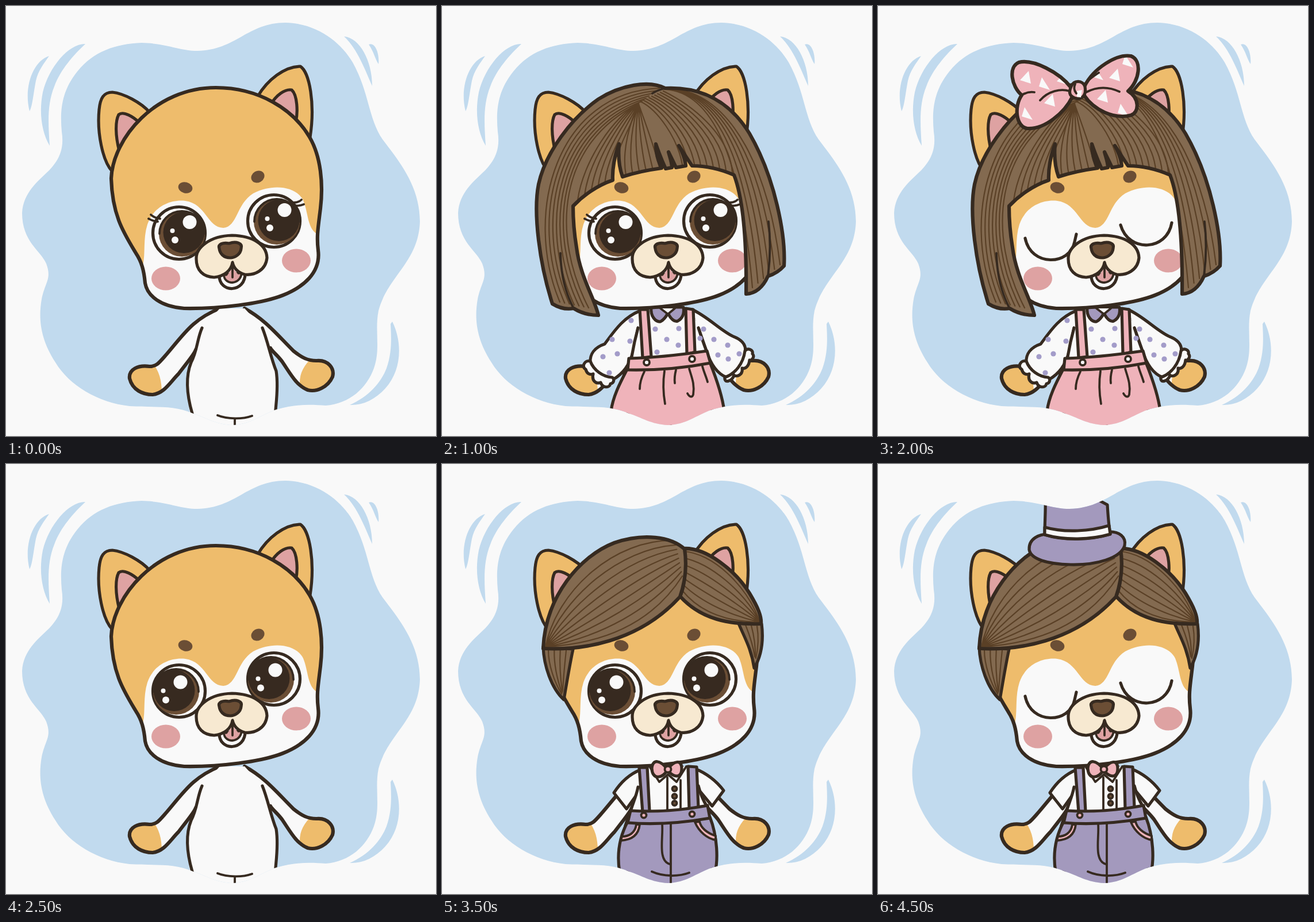
An HTML page that plays this animation: 748 px wide and 748 px high, repeating every 5000 ms.

```html
<!DOCTYPE html>
<html lang="en">
<head>
<meta charset="utf-8">
<title>Dress-up pup</title>
<style>
html, body { margin: 0; width: 100%; height: 100%; overflow: hidden; background: #f9f9f9; }
svg { display: block; width: 100%; height: 100%; }
path, circle, ellipse { fill: none; stroke-linecap: round; stroke-linejoin: round; }
.ink { stroke: #362a20; stroke-width: 5.2; }
.bold { stroke-width: 6.2; }
.thin { stroke-width: 3.8; }
.white { fill: #f9f9f9; }
.sky { fill: #c1daee; }
.tan { fill: #eebc6c; }
.rose { fill: #dea2a2; }
.cream { fill: #f7e9d1; }
.brown { fill: #6b4e35; }
.dark { fill: #372a20; }
.hair { fill: #836a50; }
.pink { fill: #efb3ba; }
.lilac { fill: #a399bd; }
.dot { fill: #a39cc9; }
.strand { stroke: #5a4026; stroke-width: 2.2; }
</style>
</head>
<body>
<svg id="stage" viewBox="0 0 748 748"></svg>
<script>
const shapes = {
  blob: 'M97 219C94 185 95 150 124 114C152 79 190 66 236 64C280 65 302 78 333 78C400 77 420 29 486 29C540 30 582 62 603 98C632 150 630 195 655 232C682 268 720 312 720 375C718 445 664 470 648 530C641 565 652 596 640 630C628 664 598 692 556 695C530 693 505 692 470 702C440 713 425 728 393 729C365 728 345 715 326 709C290 693 260 699 215 696C160 690 110 660 86 620C60 580 56 545 62 510C68 480 80 475 70 448C60 425 28 410 28 360C30 325 55 305 75 286C95 265 101 245 97 219Z',
  head: 'M365 142C440 142 500 180 528 228C548 262 552 310 547 352C543 385 540 400 543 425C548 464 517 489 482 503C445 518 370 527 310 526C270 523 246 505 242 482C240 460 236 445 226 430C205 395 185 365 183 300C186 230 260 142 365 142Z',
  arms: 'M372 526C325 545 310 570 280 605C265 622 262 627 250 627C230 624 213 632 215 648C220 668 238 676 255 676C275 674 285 655 300 640C315 620 328 605 330 598M415 526C450 545 470 570 500 600C515 612 525 617 540 617C560 615 572 630 568 645C560 663 540 672 525 668C505 660 495 640 480 618C470 605 462 600 460 595',
  bob: 'M388 143C360 128 310 138 272 162C225 195 180 255 168 310C158 360 170 450 192 518C205 526 218 528 229 526C242 534 258 538 272 538C266 510 240 470 234 420C229 390 228 370 228 348C245 330 270 312 297 303C296 285 300 260 308 240C306 262 308 280 314 297C338 289 360 285 382 282C376 270 372 258 372 240C378 258 384 272 389 283L400 281C400 272 396 262 394 254C399 264 404 274 407 281L424 278C423 266 417 252 412 243C420 255 428 268 435 278C460 278 485 284 508 294C522 330 530 400 529 501C545 500 558 490 567 470C580 466 588 460 595 452C598 400 580 300 535 222C500 165 450 140 388 143Z',
  sweepL: 'M422 148C398 126 350 120 300 137C240 160 180 230 176 321C240 324 340 312 414 231C423 205 426 175 422 148Z',
  sweepR: 'M420 147C460 145 510 185 535 225C550 250 556 265 555 278C500 280 450 270 414 230C425 205 424 170 420 147Z',
  bow: 'M336 142C315 115 270 92 245 98C226 106 232 140 250 155C236 175 240 211 260 213C290 215 325 185 338 158ZM359 140C375 108 415 83 440 87C460 95 455 130 435 148C455 160 455 185 440 190C410 198 375 180 359 156Z'
};

const path = (cls, d) => `<path class="${cls}" d="${d}"/>`;
const circle = (cls, x, y, r) => `<circle class="${cls}" cx="${x}" cy="${y}" r="${r}"/>`;
const oval = (cls, x, y, rx, ry, turn = 0) =>
  `<ellipse class="${cls}" cx="${x}" cy="${y}" rx="${rx}" ry="${ry}" transform="rotate(${turn} ${x} ${y})"/>`;
const layer = (id, body) => `<g id="${id}">${body}</g>`;
const clipped = (name, body) => `<g clip-path="url(#clip-${name})">${body}</g>`;

// Strands blended between two cubic curves
function fan(count, first, last) {
  let d = '';
  for (let i = 0; i < count; i++) {
    const k = i / (count - 1);
    const c = first.map((v, j) => (v + (last[j] - v) * k).toFixed(1));
    d += `M${c[0]} ${c[1]}C${c.slice(2).join(' ')}`;
  }
  return path('strand', d);
}

const lock = (name, strands) =>
  path('hair', shapes[name]) + clipped(name, strands) + path('ink bold', shapes[name]);

function eye(x, y, side) {
  const gx = side > 0 ? 0 : -16, gy = side > 0 ? 0 : 3.5;
  return circle('white ink', x, y, 45.5) +
    circle('brown', x + 5 * side, y + 1, 40) +
    circle('dark', x + 8.5 * side, y - 1, 36) +
    path('ink thin', `M${x + side * 5 - 39} ${y + 1}a39 39 0 0 1 78 0`) +
    circle('white', x + 18.5 + gx, y - 19 + gy, 12) +
    circle('white', x - 11.5 + gx, y - 4 + gy, 4) +
    circle('white', x - 7 + gx, y + 12 + gy, 6);
}
const eyes = side => eye(301, 395, side) + eye(466, 374, side);

const scenery = path('sky', shapes.blob) + path('sky',
  'M75 87C48 95 30 140 41 183C46 175 48 150 52 130C56 112 66 100 75 87Z' +
  'M138 66C110 65 75 105 64 150C57 185 62 220 76 243C73 200 72 170 84 140C95 110 118 85 138 66Z' +
  'M588 53C615 55 637 95 637 139C626 115 612 75 588 53Z' +
  'M631 67C643 62 650 85 648 101C642 92 640 80 631 67Z' +
  'M672 549C691 588 687 635 660 665C642 685 620 695 598 694C630 680 652 656 662 630C672 602 670 575 669 553Z');

const body =
  path('white', shapes.arms) +
  clipped('arms', path('tan', 'M254 620C268 636 272 655 271 685H200V620ZM534 610C518 625 511 638 511 656L515 685H590V610Z')) +
  path('ink bold', shapes.arms) +
  path('white', 'M372 526H415L446 560C456 585 460 610 470 635C474 660 470 690 469 740H324C317 685 310 650 322 620C333 600 332 580 341 560Z') +
  path('ink', 'M341 560C332 580 333 600 322 620C310 650 317 685 324 709M446 560C456 585 460 610 470 635C474 660 470 690 469 702') +
  path('ink thin', 'M368 712C385 719 412 719 428 713M398 718V728');

const dotSpots = [[329,547],[296,580],[327,583],[280,610],[305,605],[291,638],[371,562],[412,561],
  [391,580],[374,602],[411,590],[455,562],[473,580],[449,578],[497,590],[480,607],[498,614],[517,605]];

const dress =
  path('white ink', 'M345 530C315 542 300 565 283 588C265 594 257 606 258 620C262 635 280 650 297 650C315 640 326 625 333 600L341 560') +
  path('white ink', 'M435 528C462 540 485 565 507 575C525 582 530 592 527 605C524 625 510 640 495 646C480 640 468 625 460 600L446 560') +
  path('white', 'M345 528H435L446 560L460 602L330 614L341 560Z') +
  path('ink', 'M341 560C336 578 333 592 330 610M446 560C452 578 456 590 460 600') +
  dotSpots.map(([x, y]) => circle('dot', x, y, 4.6)).join('') +
  path('white ink', 'M258 618C248 615 242 628 250 632C252 640 258 642 263 640C260 652 268 658 276 655C280 666 292 664 293 657C300 656 300 648 296 646C280 645 264 634 258 618ZM527 600C532 594 542 598 540 605C545 610 538 618 535 616C534 626 528 632 522 630C524 642 512 646 508 642C506 652 490 658 492 646C510 640 524 622 527 600Z') +
  path('lilac ink', 'M364 524C362 540 372 550 380 549C386 546 390 540 393 534C398 545 405 550 410 548C418 544 422 535 420 524Z') +
  path('white ink thin', 'M380 526L393 536L405 526') +
  path('pink ink', 'M344 528H358L364 610L349 612ZM424 526L437 528L440 602L426 606Z') +
  path('pink ink', 'M322 632C310 655 297 680 294 705V745H491V705C488 680 478 650 466 620Z') +
  path('pink ink', 'M325 613C370 612 420 606 461 600L467 621C420 630 370 634 323 633Z') +
  path('ink thin', 'M352 636C347 646 344 656 344 666M387 635C384 655 385 675 388 692M407 633C405 641 404 648 405 656M430 631C434 645 440 658 437 676C435 682 430 680 427 674M453 627C456 638 460 646 462 654') +
  circle('white ink thin', 356, 620, 5) + circle('white ink thin', 435, 614, 5);

const suit =
  path('white ink', 'M345 532C325 540 310 555 299 572L321 600L341 572M440 530C465 540 480 555 490 568L470 595L446 566') +
  path('white', 'M345 528H440L448 562L462 600L328 608L341 560Z') +
  path('ink', 'M341 562C338 578 332 590 328 604M446 560C450 576 456 588 461 596') +
  path('ink thin', 'M392 545V604M415 550V602') +
  path('white ink thin', 'M362 528L378 553L393 540L408 553L425 526') +
  path('lilac ink', 'M343 528H357L361 604L349 606ZM428 526L443 527L446 598L430 602Z') +
  path('lilac ink', 'M323 622C308 650 304 680 309 710V745H475V710C480 690 480 650 466 614Z') +
  path('pink ink thin', 'M338 627C336 642 325 648 313 648L311 655C330 654 342 645 344 627ZM440 623C447 640 462 652 476 654V647C462 642 451 635 448 622Z') +
  path('lilac ink', 'M328 603C370 606 420 602 462 594L466 616C420 624 370 628 323 624Z') +
  path('ink thin', 'M383 627C385 650 375 690 396 696M398 626V728M365 709C385 718 412 718 430 711') +
  circle('pink ink thin', 351, 611, 4.5) + circle('pink ink thin', 435, 609, 4.5) +
  [565, 578, 590].map(y => circle('brown ink thin', 404.5, y, 4)).join('');

const tie =
  path('pink ink', 'M392 531C380 515 366 512 365 530C366 549 382 548 392 533C405 547 417 546 417 530C417 514 405 515 392 531Z') +
  circle('pink ink thin', 393, 531, 5.5);

const head =
  path('tan ink', 'M185 288C168 270 158 220 162 180C164 160 170 150 185 150C205 152 235 168 250 185M438 157C455 128 485 105 512 105C528 115 538 170 529 228') +
  path('rose ink', 'M197 252C190 225 190 200 196 189C204 182 222 193 232 203M460 172C470 155 485 144 497 146C507 155 508 185 504 202') +
  path('tan', shapes.head) +
  clipped('head', path('white', 'M238 452C243 430 238 405 246 380C256 350 285 336 312 339C348 344 350 385 378 386C403 384 400 345 430 326C465 308 505 314 517 338C526 360 524 385 540 396H570V540H220Z')) +
  path('ink bold', shapes.head) +
  oval('brown', 312, 316, 12.5, 9.5, 15) + oval('brown', 438, 297, 12, 10, -30) +
  oval('rose', 278, 474, 25, 20.5) + oval('rose', 505, 443, 25, 20.5);

const lashes = path('ink thin', 'M264 375C257 375 252 372 248 370M268 370C261 369 256 367 252 363M501 347C507 348 513 347 518 345M500 342C507 342 511 340 514 337');
const closed = path('ink', 'M256 404C266 454 334 452 342 410L345 397M422 381C436 430 503 426 511 377');

const muzzle =
  path('white ink', 'M371 468C370 500 417 500 416 464Z') +
  path('rose ink thin', 'M379 468C380 486 408 486 410 464Z') +
  path('cream ink', 'M331 440C330 420 355 400 393 399C430 400 453 415 454 438C452 460 432 469 415 467C402 463 396 455 394 446C392 460 380 470 362 472C343 471 331 460 331 440Z') +
  path('rose', 'M394 455L384 470H406Z') +
  path('ink thin', 'M394 448V472') +
  path('brown ink', 'M371 422C368 414 378 411 388 413C400 409 412 412 409 422C408 432 398 438 390 438C378 438 372 430 371 422Z');

const bob = lock('bob',
  fan(7, [378,143,200,150,140,360,205,515], [342,170,200,240,190,400,255,525]) +
  fan(6, [342,170,300,190,245,270,236,338], [342,170,335,200,300,250,295,300]) +
  fan(6, [342,170,328,200,312,250,320,294], [342,170,352,200,368,240,378,280]) +
  fan(9, [345,166,375,180,410,230,418,276], [385,148,430,170,500,220,505,290]) +
  fan(6, [388,145,470,150,520,260,540,490], [395,143,510,150,570,300,588,450])) +
  path('ink thin', 'M229 526C215 500 207 470 206 430M567 470C571 440 572 410 568 375M388 143C380 145 372 148 366 152');

const sideburns = path('hair ink', 'M176 318L228 322C222 350 217 380 212 410C190 390 177 350 176 318ZM515 275L556 278C560 310 555 335 543 355C538 320 525 300 515 275Z') +
  fan(4, [185,324,185,350,196,380,208,400], [216,324,214,345,211,370,210,395]) +
  fan(3, [528,280,534,295,541,315,544,335], [548,282,551,300,550,320,546,338]);
const crop = sideburns +
  lock('sweepR', fan(7, [420,152,470,155,530,210,553,275], [418,220,450,260,500,275,553,275])) +
  lock('sweepL', fan(9, [180,318,200,220,300,130,405,133], [180,318,290,312,370,270,418,195]));

const triangles = [[257,125],[290,136],[321,127],[260,188],[299,165],[383,119],[412,121],[435,97],[391,158],[427,182]];
const bow = path('pink', shapes.bow) +
  clipped('bow', triangles.map(([x, y], i) => path('white', `M${x + (i % 2 ? -5 : 5)} ${y - 12}L${x + 9} ${y + 10}L${x - 10} ${y + 4}Z`)).join('')) +
  path('ink bold', shapes.bow) +
  path('ink thin', 'M282 164C296 148 318 143 333 148M250 155C258 150 266 149 272 150M362 150C385 138 405 142 420 149M365 130C372 124 378 120 384 116') +
  path('pink ink', 'M336 140C341 128 356 129 360 140C363 156 354 164 342 160C332 156 332 149 336 140Z') +
  path('white', 'M346 148L355 146L353 159L346 158Z') +
  path('ink thin', 'M343 136C340 142 341 147 345 152');

const hat =
  path('lilac ink', 'M263 149C262 130 280 121 300 122C340 128 370 124 400 118C420 117 432 127 429 142C422 164 380 176 335 175C295 174 266 166 263 149Z') +
  path('lilac ink', 'M291 55C292 80 290 100 290 123C325 134 370 132 404 122C401 105 400 88 399 71L384 63V55Z') +
  path('white ink', 'M290 110C325 120 370 117 402 107L404 122C370 132 325 133 290 123Z');

const clips = Object.entries(shapes).map(([name, d]) => `<clipPath id="clip-${name}"><path d="${d}"/></clipPath>`).join('');

document.getElementById('stage').innerHTML = `<defs>${clips}</defs>` + scenery + clipped('blob',
  body + layer('dress', dress) + layer('suit', suit) + head +
  layer('lookRight', eyes(1) + lashes) + layer('lookLeft', eyes(-1)) + layer('closed', closed) + muzzle +
  layer('tie', tie) + layer('bob', bob) + layer('crop', crop) + layer('bow', bow) + layer('hat', hat));

// Half-second steps, [from, to) in which each layer shows
const showing = {
  lookRight: [0, 4], bob: [1, 5], dress: [2, 5], bow: [3, 5],
  lookLeft: [5, 9], crop: [6, 10], suit: [7, 10], tie: [7, 10], hat: [8, 10]
};
const start = performance.now();

function draw() {
  const step = Math.floor((performance.now() - start) / 500) % 10;
  const show = (id, on) => { document.getElementById(id).style.display = on ? '' : 'none'; };
  for (const [id, [from, to]] of Object.entries(showing)) show(id, step >= from && step < to);
  show('closed', step % 5 === 4);
  requestAnimationFrame(draw);
}
draw();
</script>
</body>
</html>
```
